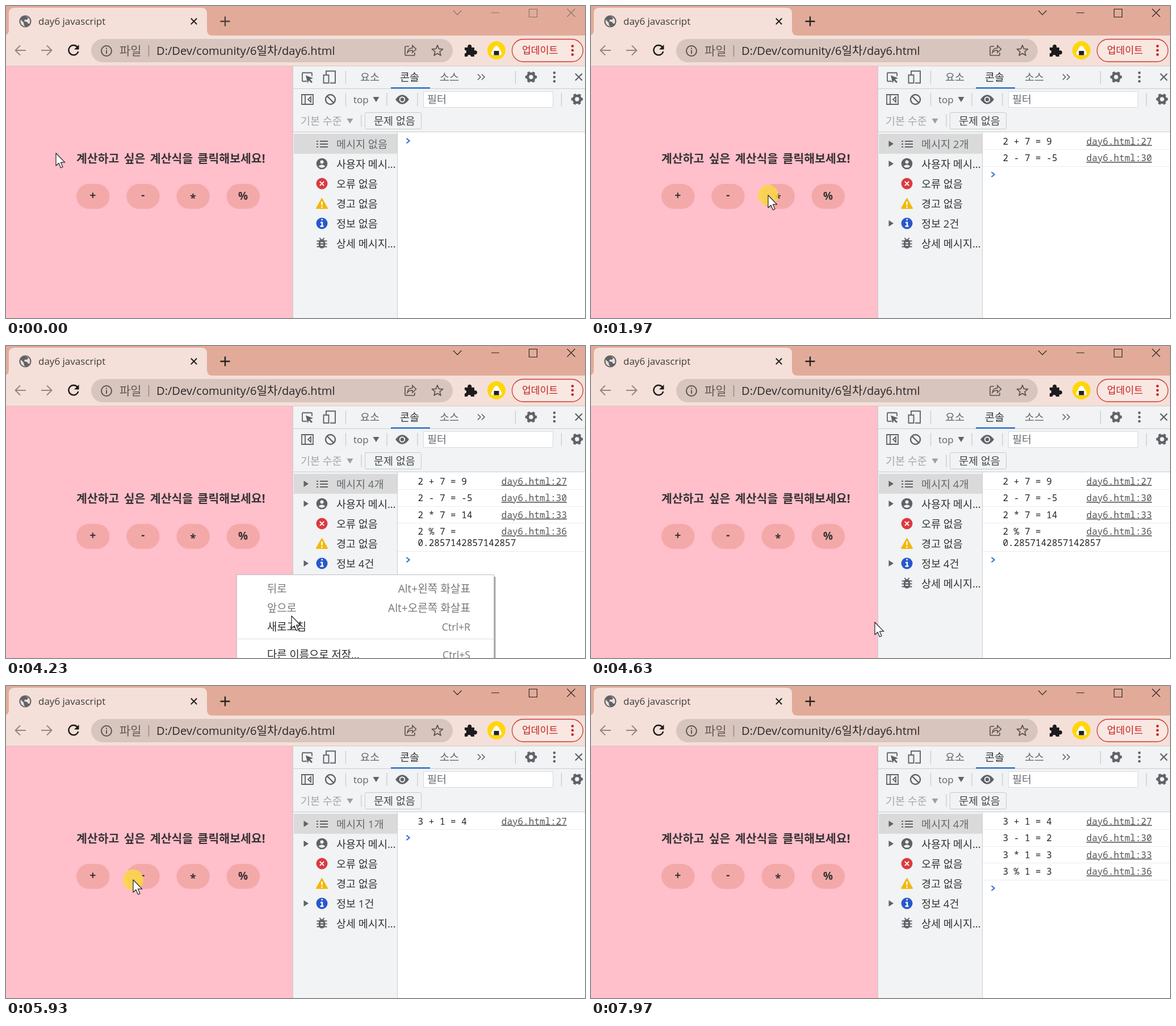
Animation, 1020 px wide and 549 px high, one loop 8300 ms. Source, as an HTML page:

```html
<!DOCTYPE html>
<html lang="ko">
<head>
<meta charset="utf-8">
<title>day6 javascript</title>
<style>
html, body { margin: 0; width: 100%; height: 100%; overflow: hidden; }
svg { display: block; width: 1020px; height: 549px; }
text { font-family: "Open Sans", "Noto Sans CJK KR", "Noto Sans CJK", "Noto Sans CJK JP", sans-serif; font-size: 18.5px; }
.log text { font-family: "Noto Sans Mono", "DejaVu Sans Mono", monospace; font-size: 16px; white-space: pre; }
</style>
</head>
<body>
<svg id="stage" viewBox="0 0 1020 549" xmlns="http://www.w3.org/2000/svg"></svg>
<script>
const LOOP = 8300;
const GREY = '#5f6368';
const stage = document.getElementById('stage');

// markup helpers
const text = (x, y, s, fill = '#333', extra = '') => `<text x="${x}" y="${y}" fill="${fill}" ${extra}>${s}</text>`;
const rect = (x, y, w, h, fill, extra = '') => `<rect x="${x}" y="${y}" width="${w}" height="${h}" fill="${fill}" ${extra}/>`;
const disc = (x, y, r, fill, extra = '') => `<circle cx="${x}" cy="${y}" r="${r}" fill="${fill}" ${extra}/>`;
const line = (d, stroke, w = 2, extra = '') => `<path d="${d}" fill="none" stroke="${stroke}" stroke-width="${w}" ${extra}/>`;
const shape = (d, fill, extra = '') => `<path d="${d}" fill="${fill}" ${extra}/>`;
const at = (x, y, s) => `<g transform="translate(${x} ${y})">${s}</g>`;
const cross = (r, stroke, w) => line(`M${-r} ${-r}L${r} ${r}M${r} ${-r}L${-r} ${r}`, stroke, w);
const dots = (x, y, fill, gap) => [-gap, 0, gap].map(d => disc(x, y + d, 2.3, fill)).join('');
const bar = (x, y1, y2) => line(`M${x} ${y1}V${y2}`, '#c6c9cd', 1.2);
const down = (x, y, fill) => shape(`M${x - 5.5} ${y - 4.5}h11l-5.5 9z`, fill);

const gear = (x, y) => at(x, y,
  `<circle r="6" fill="none" stroke="${GREY}" stroke-width="4.6"/>` +
  `<circle r="8.6" fill="none" stroke="${GREY}" stroke-width="3.4" stroke-dasharray="4.4 4.6" transform="rotate(-15)"/>`);

function star(x, y, outer, inner) {
  let d = '';
  for (let i = 0; i < 10; i++) {
    const r = i % 2 ? inner : outer, a = Math.PI * (i / 5 - .5);
    d += `${i ? 'L' : 'M'}${(x + r * Math.cos(a)).toFixed(1)} ${(y + r * Math.sin(a)).toFixed(1)}`;
  }
  return d + 'Z';
}

function browserFrame() {
  const brown = '#5d5350', dim = '#948681';
  return rect(0, 0, 1020, 53, '#e2ab99') +
    rect(0, 52, 1020, 54, '#f4e0d9') +
    shape('M-5 52Q5 52 5 42V13Q5 3 15 3H344Q354 3 354 13V42Q354 52 364 52Z', '#f4e0d9') +
    `<g id="globe">` + at(34, 27, disc(0, 0, 10.6, GREY) +
      shape('M-8 -3L-3 2L-2 7L0 9Q-8 8 -8.5 0ZM0 -8.5Q4 -8 5.5 -6L3 -3L-1 -3L-2 0L3 1L5 4L7.5 4Q9.5 -1 7 -5L4 -8Z', '#efdcd5')) + `</g>` +
    `<g id="spin">` + line('M34 18.5A8.5 8.5 0 1 1 25.5 27', '#87797a', 2.2) + `</g>` +
    text(57, 33, 'day6 javascript', '#3f3a39', 'style="font-size:17px"') +
    at(331, 27, cross(5.2, '#222', 2)) +
    `<g id="plus">` + line('M377.5 27h17M386 18.5v17', 'currentColor', 2.4) + `</g>` +
    `<g id="controls">` +
      line('M788 8l7.2 7.5L802.5 8M855 12h14M921.5 5.5h14v14h-14zM988.5 5l14 14M1002.5 5l-14 14', 'currentColor', 1.1) + `</g>` +
    line('M35 78H17M25 69.5L16.5 78L25 86.5', dim) +
    line('M62 78h18M72 69.5L80.5 78L72 86.5', dim) +
    line('M125.5 72A8.6 8.6 0 1 0 127.3 80', '#1d1b1b', 2.4) + shape('M128.5 68v8.5h-8.5z', '#1d1b1b') +
    rect(150, 58, 637, 41, '#d8c5be', 'rx="20.5"') +
    disc(177, 79, 9, 'none', `stroke="${brown}" stroke-width="2"`) +
    line('M177 77.5v6.5M177 73.5v2.2', brown, 2) +
    text(200, 86, '파일', '#615754', 'style="font-size:21px"') +
    line('M251.5 69V89', '#8e817c', 1.3) +
    text(265, 86, 'D:/Dev/comunity/6일차/day6.html', '#2b2726', 'style="font-size:20.1px"') +
    line('M710 71h-5q-2 0 -2 2v12q0 2 2 2h13q2 0 2-2v-3', brown, 1.7) +
    line('M707 82q1-8 9-8v-4.5l6.5 6.5l-6.5 6v-4q-6 0 -9 4z', brown, 1.6) +
    shape(star(760, 79, 10, 4.4), 'none', `stroke="${brown}" stroke-width="1.8" stroke-linejoin="round"`) +
    shape('M808 73h5.5a3.6 3.6 0 1 1 6.5 0h5v5.5a3.6 3.6 0 1 1 0 6.5v4h-6a3 3 0 0 0-6 0h-5v-5.5a3 3 0 0 0 0-6z', '#1d1b1b') +
    disc(864, 78, 16, '#ffd60a') +
    shape('M864 70q2.5 0 4 3l4.8 8.500q1.5 5-3 5h-11.600q-4.5 0-3-5l4.800-8.500q1.5-3 4-3z', '#fff') +
    rect(859.5, 79, 9, 7.5, '#222') +
    rect(891.5, 58.5, 125, 39.5, '#f9e7e1', 'rx="19.7" stroke="#cf3a30" stroke-width="1.3"') +
    text(909, 84, '업데이트', '#c5221f', 'style="font-size:17.2px"') +
    dots(998, 78, '#c5221f', 7.5) +
    rect(0, 105, 1020, 1, '#d9c8c2');
}

function page() {
  const labels = [['+', 340], ['-', 339], ['*', 344.5], ['%', 341]];
  return rect(0, 106, 505, 443, '#ffbfcb') +
    text(124, 275.5, '계산하고 싶은 계산식을 클릭해보세요!', '#373435', 'style="font-size:20.5px;font-weight:700;word-spacing:3px"') +
    labels.map(([s, y], i) => rect(124 + i * 88.2, 313, 58.5, 44, '#f4a9a9', 'rx="22"') +
      text(153 + i * 88.2, y, s, '#373435', 'text-anchor="middle" style="font-size:19px;font-weight:700"')).join('');
}

function toolbars() {
  return rect(505, 106, 515, 443, '#f1f3f4') +
    line('M505.5 106V549', '#c9cbcf', 1) +
    line('M530 132.5h-7q-1 0-1-1v-13q0-1 1-1h15q1 0 1 1v5', GREY, 1.8) +
    shape('M528 122l13 5l-5.5 2l4.5 4.5l-2 2l-4.5-4.5l-2 5z', GREY) +
    line('M564 121v-6.5h16v21h-9M559.5 121.5h9v14h-9z', GREY, 1.9) +
    bar(598.5, 114, 137) +
    text(624, 131.5, '요소', GREY) + text(694, 131.5, '콘솔') + text(764, 131.5, '소스', GREY) +
    line('M831 120l5 5l-5 5M838 120l5 5l-5 5', GREY, 1.6) +
    bar(897.5, 114, 137) + gear(925, 125) + dots(966, 125, GREY, 7.5) + at(1009, 125, cross(6, GREY, 2.2)) +
    rect(506, 145, 514, 1, '#cacdd1') + rect(678, 143, 69, 2.4, '#2a6fcf') +
    line('M521 156h20v17h-20zM527 156v17M537 160l-5 4.5l5 4.5z', GREY, 1.8) +
    line('M580 164.5a8.5 8.5 0 1 0-17 0a8.5 8.5 0 1 0 17 0M565.5 158.5l12 12', GREY, 2.4) +
    bar(598.5, 153, 176) + text(612, 170.5, 'top', GREY, 'style="font-size:17px"') + down(652, 164.5, GREY) +
    bar(671, 153, 176) +
    shape('M686 164.5Q698 148 710 164.5Q698 181 686 164.5Z', GREY) +
    disc(698, 164.5, 4.2, GREY, 'stroke="#f1f3f4" stroke-width="2"') +
    bar(725, 153, 176) + rect(735.5, 150.5, 228, 28, '#fff', 'stroke="#d7dadd"') + text(742, 171, '필터', '#696d71') +
    bar(978.5, 153, 176) + gear(1006, 164) +
    text(519, 208.5, '기본 수준', '#a3a7ab') + down(606, 202.5, '#9ba0a5') + bar(626, 191, 213) +
    rect(632.5, 187.5, 99, 29, '#f1f3f4', 'rx="2" stroke="#c6c9cc"') + text(648, 208.5, '문제 없음', '#44474a') +
    rect(506, 221, 514, 1, '#cacdd1');
}

function sidebarIcons() {
  return line('M553 238h14M553 243h14M553 248h14', GREY, 2) + line('M547 238h3M547 243h3M547 248h3', GREY, 2) +
    at(556.5, 277.5, disc(0, 0, 9.8, GREY) + disc(0, -3, 3, '#f1f3f4') + shape('M-6 4.5Q0 -1 6 4.5Q0 10 -6 4.5Z', '#f1f3f4')) +
    at(556.5, 312.5, disc(0, 0, 10, '#dc3a40') + cross(3.6, '#fff', 2)) +
    shape('M556.5 339l9.5 17h-19z', '#f3b80a', 'stroke="#f3b80a" stroke-width="2" stroke-linejoin="round"') +
    line('M556.5 344v6.5M556.5 352.5v2.5', '#fff', 2.4) +
    at(556.5, 382.5, disc(0, 0, 10, '#2757cb') + line('M-2.5 -1.5H0.5V5M-3 5h6M-1 -6.5h2.5', '#fff', 2.4)) +
    at(556.5, 417.5, rect(-5.5, -7, 11, 16, GREY, 'rx="5.5"') +
      line('M-9 -4h18M-9 1h18M-9 6h18M-4 -9.5l3 4M4 -9.5l-3 4', GREY, 2) + line('M-2.5 -1h5M-2.5 3.5h5', '#f1f3f4', 1.8));
}

function sidebar(n) {
  const row = (y, s, fill) => text(582, y, s, fill);
  const arrow = y => shape(`M524.5 ${y - 5.5}l8.5 5.5l-8.5 5.5z`, GREY);
  return rect(507, 222, 182, 327, '#f1f3f4') + rect(507, 225, 182, 35, '#dadada') +
    sidebarIcons() + (n ? [242.5, 277.5, 382.5].map(arrow).join('') : '') +
    row(249.5, n ? `메시지 ${n}개` : '메시지 없음', '#65686c') +
    row(284.5, '사용자 메시...') + row(319.5, '오류 없음') + row(354.5, '경고 없음') +
    row(389.5, n ? `정보 ${n}건` : '정보 없음') + row(424.5, '상세 메시지...');
}

const ops = [['+', (a, b) => a + b], ['-', (a, b) => a - b], ['*', (a, b) => a * b], ['%', (a, b) => a / b]];

function log(n, a, b) {
  let out = rect(690, 222, 330, 327, '#fff') + line('M689.5 222V549', '#cacdd1', 1), y = 222.5;
  ops.slice(0, n).forEach(([sign, calc], i) => {
    const value = String(calc(a, b)), head = `${a} ${sign} ${b} =`, wrap = value.length > 8;
    out += text(725.5, y + 21, wrap ? head : head + ' ' + value, '#242424') +
      text(988, y + 21, `day6.html:${27 + i * 3}`, '#555', 'text-anchor="end" text-decoration="underline"');
    if (wrap) {
      out += text(725.5, y + 41, value, '#242424');
      y += 20.5;
    }
    y += 29.6;
    out += rect(690, Math.round(y), 330, 1, '#ececee');
  });
  return `<g class="log">${out}</g>` + line(`M705.5 ${y + 10.5}l5.2 4.3l-5.2 4.3`, '#2f6fcf', 2);
}

function menu() {
  const item = (y, s, key, fill, size = 19.1) => text(460, y, s, fill, 'style="font-size:18.8px"') +
    text(818, y, key, '#75787b', `text-anchor="end" style="font-size:${size}px"`);
  return rect(410, 406, 452.5, 150, '#000', 'opacity=".35"') +
    rect(406.5, 402.5, 453, 160, '#fff', 'stroke="#bfbfc1"') +
    item(433.5, '뒤로', 'Alt+왼쪽 화살표', '#75787b') +
    item(467.5, '앞으로', 'Alt+오른쪽 화살표', '#75787b') +
    item(500.5, '새로고침', 'Ctrl+R', '#2a2a2a', 17.7) +
    rect(408, 515, 451, 1, '#dcdde0') +
    item(549.5, '다른 이름으로 저장...', 'Ctrl+S', '#2a2a2a', 17.7);
}

stage.innerHTML = browserFrame() + page() + toolbars() +
  `<g id="side"></g><g id="out"></g><g id="menu">${menu()}</g>` +
  `<circle id="tap" r="18" fill="#fcd944"/>` +
  `<path id="mouse" d="M0 0V22L5 17.5L8.5 25.8L12 24.3L8.5 16.2H15.7Z" fill="#fff" stroke="#222" stroke-width="1.2" stroke-linejoin="round"/>`;
const el = Object.fromEntries([...stage.querySelectorAll('[id]')].map(e => [e.id, e]));

// pointer legs: start, end, x, y
const legs = [
  [0, 0, 88, 259], [70, 480, 155, 345], [1000, 1450, 226, 338], [1640, 1770, 312, 333],
  [2400, 2790, 425, 345], [3000, 3150, 407, 402], [3750, 4230, 503, 475], [4230, 4300, 500, 486],
  [4640, 5130, 170, 349], [5560, 5730, 224, 341], [6090, 6340, 309, 342.5], [6550, 6670, 329, 343],
  [6980, 7150, 411, 345], [7550, 7900, 440, 479]
];
const taps = [620, 1500, 1970, 2860, 3480, 4430, 5410, 5930, 6810, 7350];
const rounds = [
  { from: 0, a: 2, b: 7, times: [740, 1590, 2100, 2940] },
  { from: 4640, a: 3, b: 1, times: [5530, 6050, 6930, 7470] }
];

const clamp = v => Math.max(0, Math.min(1, v));
const ease = v => v * v * (3 - 2 * v);
const show = (e, on) => e.setAttribute('display', on ? 'inline' : 'none');

function pointer(t) {
  let [, , x, y] = legs[0];
  for (const [t0, t1, x1, y1] of legs.slice(1)) {
    if (t < t0) break;
    const k = ease(clamp((t - t0) / (t1 - t0)));
    x += (x1 - x) * k;
    y += (y1 - y) * k;
  }
  return [x, y];
}

let shown = '';
function draw(t) {
  const round = rounds[t < rounds[1].from ? 0 : 1];
  const n = round.times.filter(m => t >= m).length;
  const key = n + ':' + round.a;
  if (key !== shown) {
    shown = key;
    el.side.innerHTML = sidebar(n);
    el.out.innerHTML = log(n, round.a, round.b);
  }
  const active = t >= 690;
  el.controls.setAttribute('color', active ? '#222' : '#85706a');
  el.plus.setAttribute('color', active ? '#222' : '#4d4341');
  const loading = t >= 4640 && t < 4780;
  show(el.globe, !loading);
  show(el.spin, loading);
  show(el.menu, t >= 3620 && t < 4570);

  const move = `translate(${pointer(t).map(v => v.toFixed(2)).join(' ')})`;
  el.mouse.setAttribute('transform', move);
  show(el.mouse, t < 7940);
  const age = t - (taps.filter(p => p <= t).pop() ?? -1000);
  el.tap.setAttribute('transform', move);
  el.tap.setAttribute('opacity', .85 * (1 - clamp((age - 100) / 80)));
}

function tick(now) {
  draw(now % LOOP);
  requestAnimationFrame(tick);
}
draw(0);
requestAnimationFrame(tick);
</script>
</body>
</html>
```
